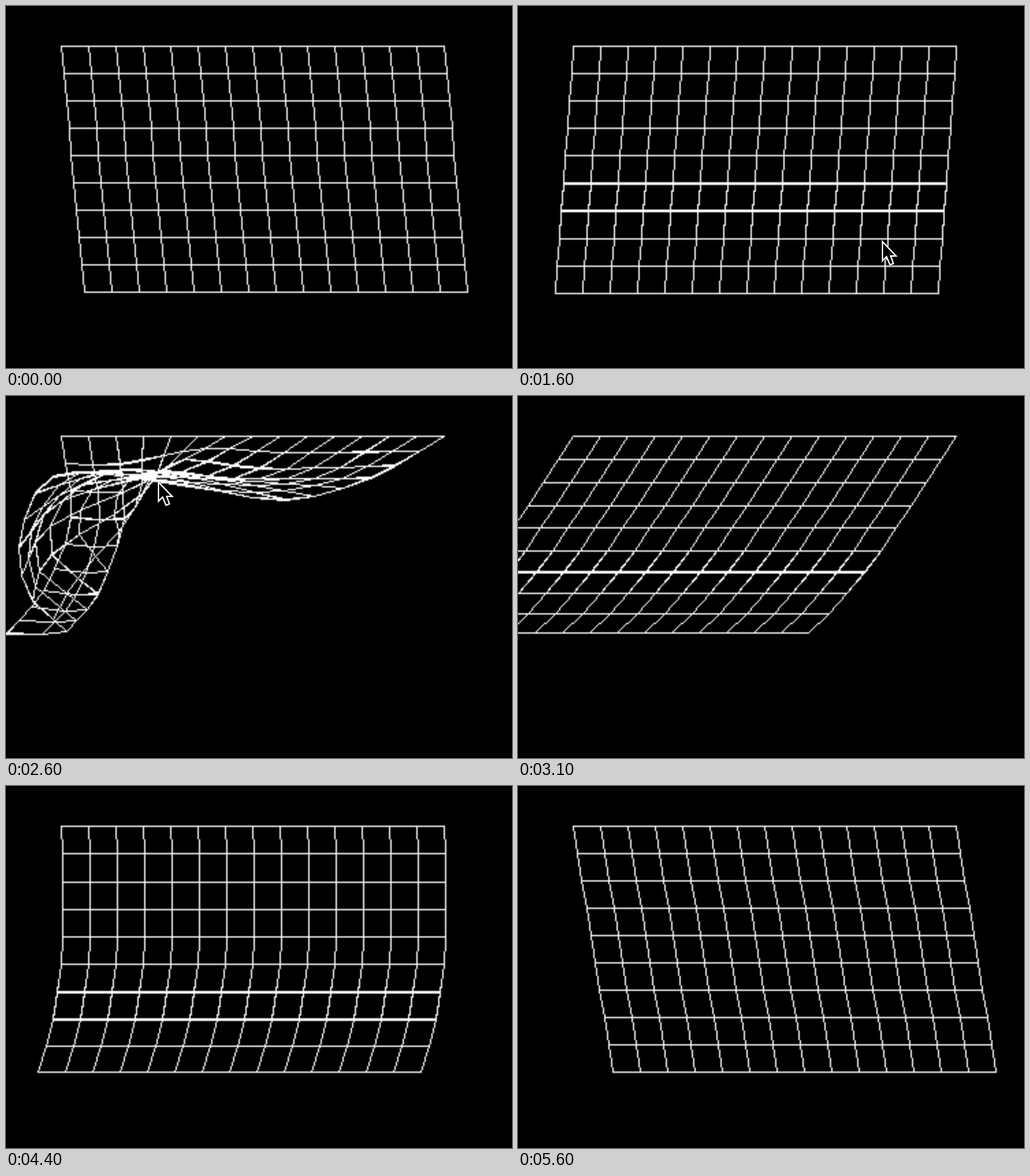
An HTML page with a canvas for the animation above (5.7 s loop, 740 by 530 pixels).

```html
<!DOCTYPE html>
<html>
<head>
<meta charset="utf-8">
<title>Swinging cloth</title>
<style>
html, body { margin: 0; width: 740px; height: 530px; overflow: hidden; background: #000; }
canvas { display: block; width: 740px; height: 530px; filter: brightness(1.15); }
svg { position: absolute; left: 0; top: 0; }
</style>
</head>
<body>
<canvas id="view" width="370" height="265"></canvas>
<svg width="740" height="530"><path id="cursor" d="M0 0V28L6 22L11 34L16 32L12 21H20Z" fill="#000" stroke="#fff" stroke-width="2"/></svg>
<script>
const COLS = 15, ROWS = 10, STEP = 100, FRAMES = 57;
const LEFT = 80.9, TOP = 59.4, CELL = 40;
const GRAB = 1900, RELEASE = 3100;
const ctx = view.getContext('2d');
ctx.fillStyle = '#fff';

const wave = (t, period) => Math.sin(2 * Math.PI * t / period);
const topX = c => LEFT + CELL * c;
const mesh = fn => Array.from({length: ROWS * COLS}, (_, n) => fn(Math.floor(n / COLS), n % COLS));

function segment(knots, x) {
  let i = 0;
  while (i < knots.length - 2 && x >= knots[i + 1]) i++;
  return i;
}

// Smooth curve through the given values
function curve(knots, vals, x) {
  const last = knots.length - 1, i = segment(knots, x);
  const slope = j => {
    const a = Math.max(0, j - 1), b = Math.min(last, j + 1);
    return (vals[b] - vals[a]) / (knots[b] - knots[a]);
  };
  const h = knots[i + 1] - knots[i], u = (x - knots[i]) / h, v = 1 - u;
  return vals[i] * v * v * (1 + 2 * u) + vals[i + 1] * u * u * (3 - 2 * u)
    + h * u * v * (slope(i) * v - slope(i + 1) * u);
}

// Pendulum swing plus a faster whip of the lower hem
function swing(t) {
  if (t <= GRAB) return {lean: 36.5 * wave(730 - t, 2330), whip: -4 * wave(t, 1600), len: 40.22};
  const fade = Math.exp((3600 - t) / 5300);
  const lean = 256 * fade * wave(4420 - t, 2130), whip = 54 * fade * wave(t - 3200, 1600);
  return {lean, whip, len: 40.5 - (lean + whip) ** 2 / 1e5};
}

// Every thread keeps its length, so leaning lifts the rows
function swingPose(t) {
  const {lean, whip, len} = swing(t), chain = [[0, TOP]];
  for (let r = 1; r < ROWS; r++) {
    const u = r / (ROWS - 1), x = lean * u + whip * u ** 3, dx = x - chain[r - 1][0];
    chain.push([x, chain[r - 1][1] + Math.sqrt(Math.max(0, len * len - dx * dx))]);
  }
  return mesh((r, c) => [topX(c) + chain[r][0], chain[r][1]]);
}

// Hanging cloth with its lower right corner pulled to (x, y)
function pullPose(x, y) {
  return mesh((r, c) => {
    const w = (c / 14) ** 0.7 * r / 9;
    return [topX(c) + w * (x - topX(14)), TOP + CELL * r + w * (y - TOP - 9 * CELL)];
  });
}

// Folded cloth: rows 3, 6 and 9 run through a few points
const foldCols = [0, 2, 4, 6, 9, 14];
const folds = [
  [[95, 178], [172, 180], [200, 142], [226, 110], [333, 121], [532, 120]],
  [[55, 285], [134, 290], [67, 232], [83, 153], [187, 107], [408, 152]],
  [[0, 348], [88, 345], [38, 300], [18, 222], [68, 118], [260, 130]]
];

function foldPose() {
  return mesh((r, c) => [0, 1].map(k => {
    const column = folds.map(row => curve(foldCols, row.map(p => p[k]), c));
    return curve([0, 3, 6, 9], [k ? TOP : topX(c), ...column], r);
  }));
}

const dragTimes = [GRAB, 2250, 2600, RELEASE];
const dragPoses = [swingPose(GRAB), pullPose(350, 10), foldPose(), swingPose(RELEASE)];

function pose(t) {
  if (t <= GRAB || t >= RELEASE) return swingPose(t);
  return mesh((r, c) => [0, 1].map(k =>
    curve(dragTimes, dragPoses.map(p => p[r * COLS + c][k]), t)));
}

function line(p, q, shift) {
  const cell = ([x, y]) => [Math.floor(x / 2), Math.floor(y / 2 + shift)];
  const [x, y] = cell(p), [x2, y2] = cell(q);
  const n = Math.max(Math.abs(x2 - x), Math.abs(y2 - y), 1);
  for (let i = 0; i <= n; i++)
    ctx.fillRect(Math.round(x + (x2 - x) * i / n), Math.round(y + (y2 - y) * i / n), 1, 1);
}

function drawCloth(t) {
  const pts = pose(t);
  ctx.clearRect(0, 0, 370, 265);
  // Two passes thicken threads lying between pixel rows
  for (const shift of [-0.05, 0.05])
    pts.forEach((p, n) => {
      if (n % COLS < COLS - 1) line(p, pts[n + 1], shift);
      if (n + COLS < pts.length) line(p, pts[n + COLS], shift);
    });
}

// Pointer path: time, x, y
const path = [
  [500, 682, 408], [700, 584, 345], [1600, 533, 345], [1850, 533, 345],
  [2250, 350, 5], [2600, 223, 126], [2900, -40, 60]
];

function drawCursor(t) {
  const shown = t >= path[0][0] && t < path[path.length - 1][0];
  cursor.style.display = shown ? '' : 'none';
  if (!shown) return;
  const i = segment(path.map(k => k[0]), t), a = path[i], b = path[i + 1];
  const u = (t - a[0]) / (b[0] - a[0]);
  const [x, y] = [1, 2].map(k => a[k] + (b[k] - a[k]) * u);
  cursor.setAttribute('transform', `translate(${x} ${y})`);
}

let shownFrame = -1;
const start = performance.now();
function tick() {
  const frame = Math.floor(Math.max(0, performance.now() - start) / STEP) % FRAMES;
  if (frame !== shownFrame) {
    shownFrame = frame;
    drawCloth(frame * STEP);
    drawCursor(frame * STEP);
  }
  requestAnimationFrame(tick);
}
tick();
</script>
</body>
</html>
```
